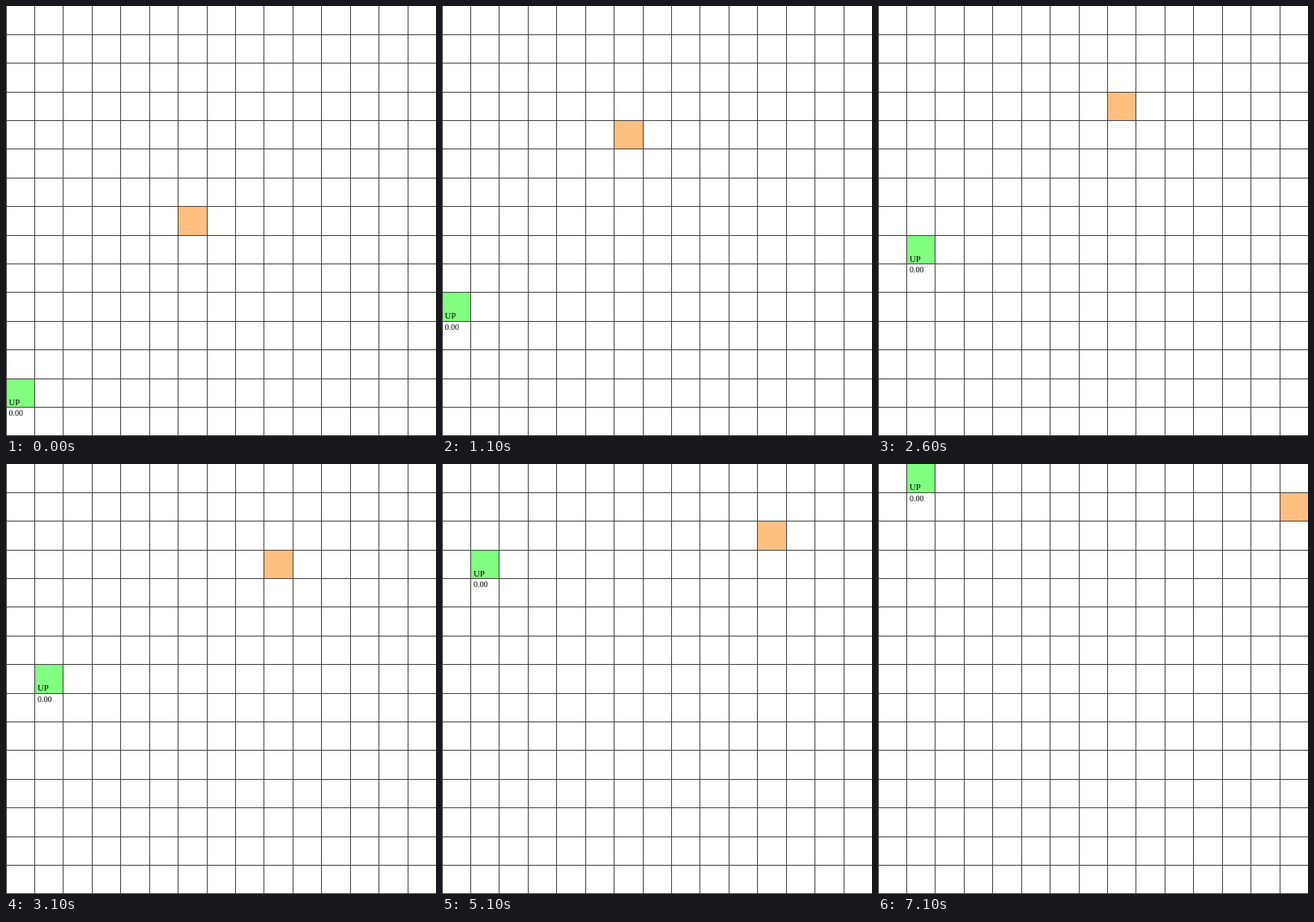
An HTML page with a canvas for the animation above (8000 ms loop, 531 by 531 pixels).

```html
<!DOCTYPE html>
<html lang="en">
<head>
<meta charset="utf-8">
<title>Grid walk</title>
<style>
  html, body { margin: 0; width: 100%; height: 100%; overflow: hidden; background: #fff; }
  canvas { display: block; width: 531px; height: 531px; }
</style>
</head>
<body>
<canvas id="stage" width="531" height="531"></canvas>
<script>
const SIZE = 531, CELLS = 15, LOOP = 8000;
const FIRST = 100, STEP = 500, LAST = 15;
const LABELS = { U: 'UP', R: 'RIGHT' };
const agent = { col: 0, row: 13, moves: 'UUUUURUUUUUUUUUU', color: '#80ff80' };
const target = { col: 6, row: 7, moves: 'UUURRURRR-UURRR', color: '#ffbf80' };

const ctx = document.getElementById('stage').getContext('2d');
const gridX = k => Math.floor(k * 35.43);
const gridY = k => Math.max(0, Math.floor(k * 35.4 - 0.1));

function cellAt(walker, step) {
  let { col, row } = walker;
  for (const move of walker.moves.slice(0, step)) {
    if (move === 'U') row = Math.max(0, row - 1);
    if (move === 'R') col = Math.min(CELLS - 1, col + 1);
  }
  return { col, row };
}

function fillCell({ col, row }, color) {
  const x = gridX(col), y = gridY(row);
  ctx.fillStyle = color;
  ctx.fillRect(x, y, gridX(col + 1) - x, gridY(row + 1) - y);
}

function drawGrid() {
  ctx.fillStyle = '#444';
  for (let k = 0; k < CELLS; k++) {
    ctx.fillRect(gridX(k), 0, 1, SIZE);
    ctx.fillRect(0, gridY(k + 1), SIZE, 1);
  }
}

function drawText(text, x, y, size) {
  ctx.font = `${size}px "Liberation Serif", serif`;
  ctx.fillStyle = '#000';
  ctx.fillText(text, x, y);
}

function draw(time) {
  const step = time < FIRST ? 0 : Math.min(LAST, Math.floor((time - FIRST) / STEP) + 1);
  const cell = cellAt(agent, step);

  ctx.fillStyle = '#fff';
  ctx.fillRect(0, 0, SIZE, SIZE);
  fillCell(cellAt(target, step), target.color);
  fillCell(cell, agent.color);
  drawGrid();

  const x = cell.col * 35.4 + 3.6, y = cell.row * 35.4;
  drawText(LABELS[agent.moves[step]], x, y + 32.3, 10.7);
  drawText('0.00', x, y + 46, 10);
}

const start = performance.now();
function tick() {
  draw((performance.now() - start) % LOOP);
  requestAnimationFrame(tick);
}
tick();
</script>
</body>
</html>
```
